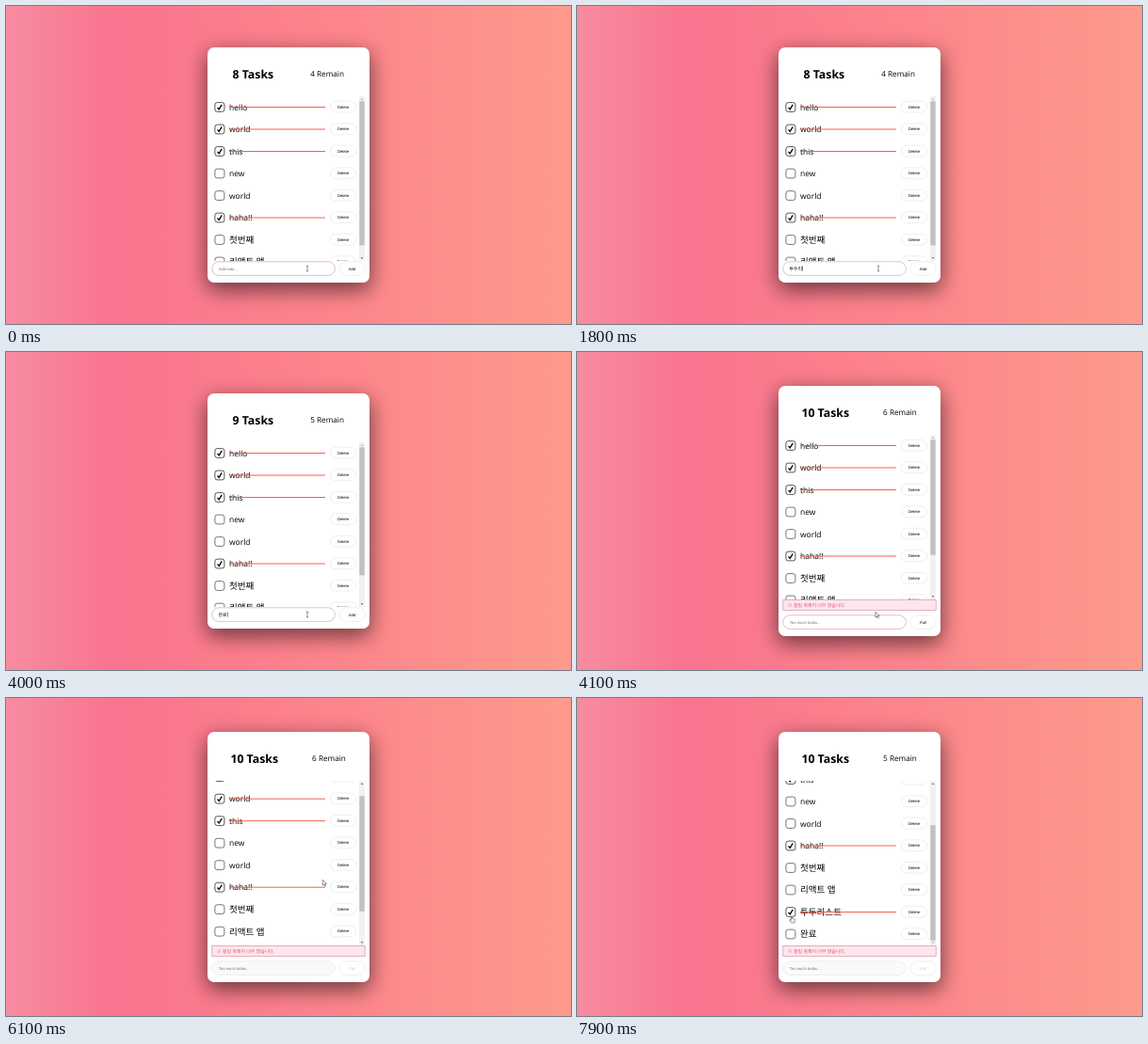
Recreate the animation shown at these times as an HTML page. Size 600x338 px, loop 8 s.

```html
<!DOCTYPE html>
<html lang="ko">
<head>
<meta charset="utf-8">
<title>Todo list</title>
<style>
html, body { margin: 0; width: 100%; height: 100%; overflow: hidden; }
body { background: linear-gradient(to right, #f78ca0 0%, #f9748f 19%, #fd868c 60%, #fe9a8b 100%); }
#card {
  position: absolute; left: 214.4px; width: 171.2px;
  border-radius: 7px; background: #fff;
  box-shadow: 0 7px 22px 1px rgba(0, 0, 0, .56);
}
svg { position: absolute; left: 0; top: 0; display: block; }
text { font-family: "Open Sans", "Noto Sans CJK KR", sans-serif; text-rendering: geometricPrecision; fill: #000; }
#title { font-size: 12.3px; font-weight: 700; }
#remain { font-size: 8.2px; }
.name { font-size: 8.5px; }
.ko { font-size: 9.55px; }
.small { font-family: "Liberation Sans", "Noto Sans CJK KR", sans-serif; font-size: 4.17px; }
.mid { text-anchor: middle; }
.pill { fill: #fff; stroke: #e9e9e9; stroke-width: .7; }
.box { fill: #fff; stroke: #555; stroke-width: .8; }
.tick { fill: none; stroke: #000; stroke-width: 1.3; }
.strike { stroke: #f4604a; stroke-width: 1; }
#typed { font-size: 4.9px; }
#hint { fill: #757575; }
#alert rect { fill: #fde6ec; stroke: #db8fa6; stroke-width: .7; }
#alert text { font-size: 4.95px; fill: #dc5673; }
</style>
</head>
<body>
<div id="card"></div>
<svg width="600" height="338" viewBox="0 0 600 338">
  <clipPath id="view"><rect x="214" y="52" width="172" height="175"/></clipPath>
  <g id="app">
    <text id="title" y="33"></text>
    <text id="remain" y="31.4"></text>
    <g clip-path="url(#view)"><g id="list"></g></g>
    <rect x="375" y="52" width="6" height="175" fill="#f1f1f1"/>
    <rect id="thumb" x="375.3" width="5.4" fill="#c1c1c1"/>
    <path id="up" d="M376.6 55.8h2.8l-1.4-1.6z"/>
    <path id="down" d="M376.6 223.2h2.8l-1.4 1.6z"/>
    <g id="alert">
      <rect x="218.8" y="227.3" width="162.4" height="11"/>
      <text x="223.8" y="234.6">※ 할일 목록이 너무 많습니다.</text>
    </g>
    <g id="foot">
      <rect id="field" class="pill" x="218.8" y="227.8" width="130.6" height="14.6" rx="7.3"/>
      <text id="hint" class="small" x="225.8" y="236.5"></text>
      <text id="typed" class="small" x="225.6" y="236.7"></text>
      <rect id="caret" y="232.4" width=".5" height="5.2"/>
      <rect id="addBox" class="pill" x="353.8" y="227.8" width="27.4" height="14.6" rx="7.3"/>
      <text id="add" class="small mid" x="367.5" y="236.5"></text>
    </g>
  </g>
  <g id="mouse">
    <path id="beam" d="M-1.2 -2.8h2.4M0 -2.8v5.6M-1.2 2.8h2.4" fill="none" stroke="#444" stroke-width=".6"/>
    <path id="arrow" d="M0 0v5.8l1.3 -1.2l1 2.2l1 -.5l-1 -2.1h1.8z" fill="#fff" stroke="#222" stroke-width=".5"/>
    <path id="hand" d="M-.6 0q.6 -.7 1.1 0v2.2l2.5 .6q.7 .3 .5 1.2l-.6 2.6h-3.4l-1.9 -2.8q.2 -.9 1.2 -.2l.6 .6z" fill="#fff" stroke="#222" stroke-width=".5"/>
  </g>
</svg>
<script>
const LOOP = 8000, PITCH = 23.5, VIEW = 175, TOP = 52;
const ADD_1 = 2500, ADD_2 = 4100, CHECK = 7400;
const $ = id => document.getElementById(id);
const show = (el, on) => el.setAttribute('visibility', on ? 'visible' : 'hidden');
const set = (el, attrs) => { for (const k in attrs) el.setAttribute(k, attrs[k]); };

const tasks = [['hello', 1], ['world', 1], ['this', 1], ['new'], ['world'], ['haha!!', 1],
  ['첫번째'], ['리액트 앱'], ['투두리스트'], ['완료']];

$('list').innerHTML = tasks.map(([name], i) => {
  const y = TOP + 11.5 + i * PITCH;
  const ko = name > '가' ? ' ko' : '';
  return `<g transform="translate(0 ${y})">
    <rect class="box" x="221.9" y="-4.9" width="10" height="9.8" rx="2.4"/>
    <path class="tick" d="M224.5 .3l1.7 2l3 -4.9"/>
    <text class="name${ko}" x="237" y="${ko ? 3.4 : 3.2}">${name}</text>
    <path class="strike" d="M237 0H339"/>
    <rect class="pill" x="344.3" y="-6.2" width="27.4" height="11.8" rx="5.9"/>
    <text class="small mid" x="358" y="1.1">Delete</text>
  </g>`;
}).join('');
const rows = [...$('list').children];

const typing = [[0, ''], [1000, 'ㅌ'], [1200, '투'], [1400, '툳'], [1600, '투두'], [1800, '투두리'],
  [1900, '투두릿'], [2000, '투두리스'], [2100, '투두리슽'], [2200, '투두리스트'], [ADD_1, ''],
  [3300, 'ㅇ'], [3400, '오'], [3500, '와'], [3600, '완'], [3700, '완ㄹ'], [4000, '완료'], [ADD_2, '']];

const mouseX = [[0, 320], [4099, 320], [4100, 317], [4800, 317], [5100, 330], [5300, 330],
  [5700, 336.3], [6300, 336.3], [6600, 247.5], [7100, 228]];
const mouseY = [[0, 279], [4099, 279], [4100, 276.2], [4800, 276.2], [5100, 238], [5300, 238],
  [5700, 193.3], [6300, 193.3], [6600, 241.2], [7100, 232.2]];
const scrolling = [[6000, 0], [6300, 60]];

const ease = p => p * p * (3 - 2 * p);
const span = (t, a, b) => ease(Math.min(1, Math.max(0, (t - a) / (b - a))));
const mix = (a, b, p) => `rgb(${a.map((v, i) => Math.round(v + (b[i] - v) * p))})`;

function at(keys, t) {
  let v = keys[0][1];
  for (let i = 1; i < keys.length; i++) {
    v += (keys[i][1] - keys[i - 1][1]) * span(t, keys[i - 1][0], keys[i][0]);
  }
  return v;
}

function render(t) {
  const full = t >= ADD_2, count = 8 + (t >= ADD_1) + full;
  const top = full ? 36 : 44;
  $('card').style.top = top + 'px';
  $('card').style.height = (full ? 266 : 250) + 'px';
  set($('app'), { transform: `translate(0 ${top})` });
  set($('foot'), { transform: `translate(0 ${full ? 16 : 0})` });
  show($('alert'), full);

  $('title').textContent = count + ' Tasks';
  set($('title'), { x: full ? 238.4 : 240.5 });
  $('remain').textContent = count - 4 - (t >= CHECK) + ' Remain';
  set($('remain'), { x: full ? 325.1 : 323.2 });

  const scroll = at(scrolling, t), total = count * PITCH;
  const track = VIEW - 10.6, thumb = track * VIEW / total;
  set($('list'), { transform: `translate(0 ${-scroll})` });
  set($('thumb'), { y: TOP + 5.3 + track * scroll / total, height: thumb });
  set($('up'), { fill: scroll > 0 ? '#505050' : '#a3a3a3' });
  set($('down'), { fill: scroll < total - VIEW - .5 ? '#505050' : '#a3a3a3' });

  rows.forEach((row, i) => {
    const done = tasks[i][1] || (i === 8 && t >= CHECK);
    const line = i === 8 ? span(t, CHECK, CHECK + 400) : 1;
    show(row, i < count);
    show(row.querySelector('.tick'), done && i < count);
    const strike = row.querySelector('.strike');
    show(strike, done && i < count);
    set(strike, { d: `M237 0H${237 + 102 * line}` });
    row.querySelector('.box').style.stroke = done ? '#2a2a2a' : '#555';
  });

  const text = typing.filter(k => k[0] <= t).pop()[1];
  $('typed').textContent = text;
  $('hint').textContent = text ? '' : full ? 'Too much todos...' : 'Add todo...';
  show($('caret'), text);
  set($('caret'), { x: 225.9 + text.length * 4.51 });

  const off = span(t, ADD_2, 4600), pink = [222, 160, 174], grey = [190, 184, 186];
  $('field').style.stroke = full ? mix(pink, [232, 232, 232], off) : mix(pink, grey, span(t, 100, 700));
  $('field').style.fill = mix([255, 255, 255], [250, 250, 250], off);
  $('add').textContent = full ? 'Full' : 'Add';
  $('add').style.fill = mix([0, 0, 0], [200, 200, 200], off);

  set($('mouse'), { transform: `translate(${at(mouseX, t)} ${at(mouseY, t)})` });
  show($('beam'), !full);
  show($('arrow'), full && t < 7000);
  show($('hand'), t >= 7000);
}

function tick() {
  render(performance.now() % LOOP);
  requestAnimationFrame(tick);
}
tick();
</script>
</body>
</html>
```
